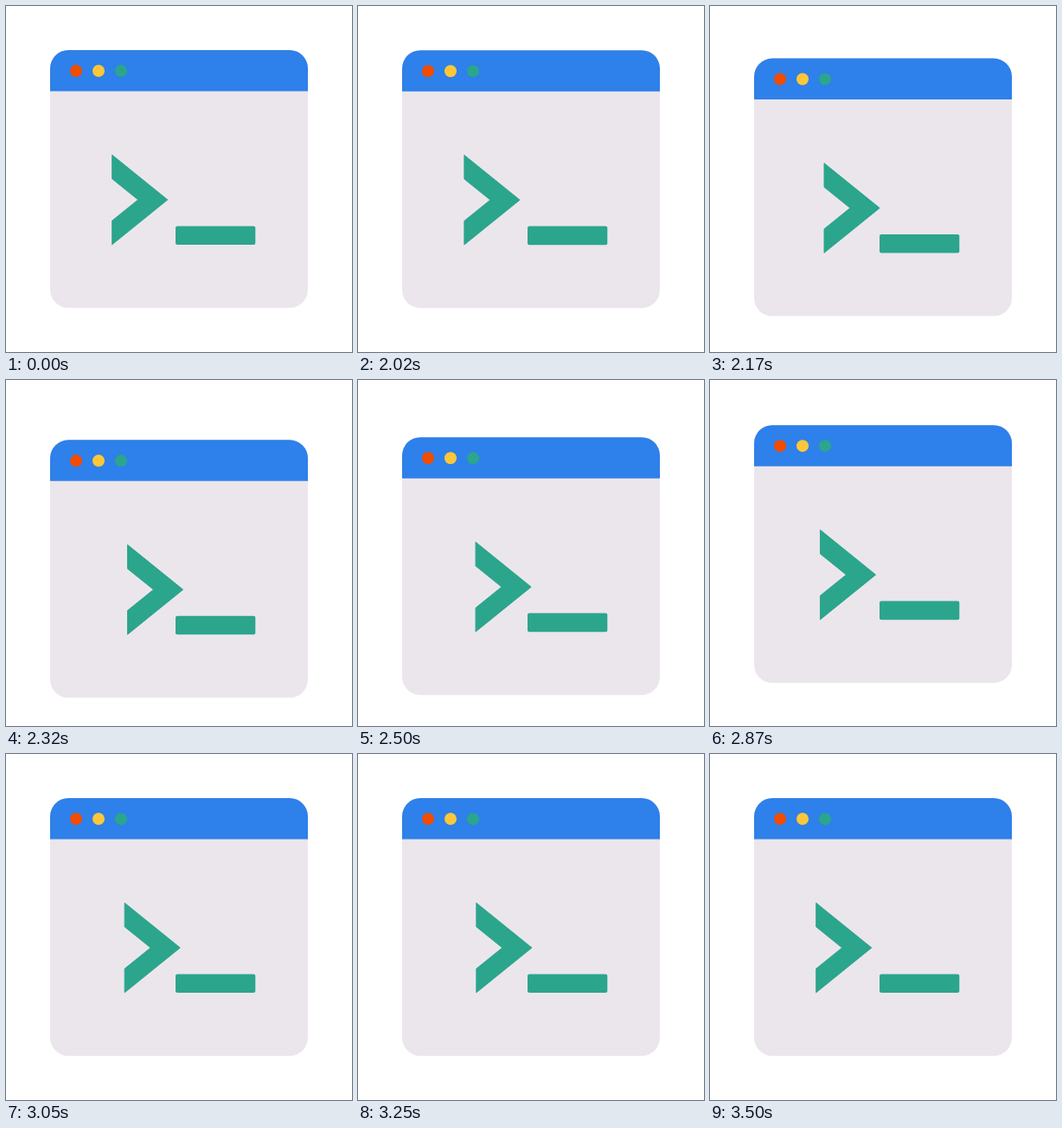
Write an HTML page that moves like this. It is 400 px wide and 400 px high and loops after 3.52 s.

```html
<!DOCTYPE html>
<html lang="en">
<head>
<meta charset="utf-8">
<title>Terminal window</title>
<style>
  html, body { margin: 0; width: 100%; height: 100%; overflow: hidden; background: #fff; }
  svg { display: block; width: 100%; height: 100%; }
</style>
</head>
<body>
<svg viewBox="0 0 400 400">
  <g id="win">
    <rect x="51" y="51" width="298" height="298" rx="21" fill="#ebe6ec"/>
    <path d="M51 98.5V72a21 21 0 0 1 21-21H328a21 21 0 0 1 21 21V98.5Z" fill="#2e80ea"/>
    <circle cx="81" cy="75" r="7" fill="#f24c00"/>
    <circle cx="107" cy="75" r="7" fill="#ffc738"/>
    <circle cx="133" cy="75" r="7" fill="#2ca58d"/>
    <rect x="196" y="254.4" width="92.3" height="21.6" rx="2" fill="#2ca58d"/>
    <path id="prompt" d="M122.7 172.2L186.8 224L122.7 275.8V248.2L152.7 224L122.7 199.8Z"
      fill="#2ca58d" stroke="#2ca58d" stroke-width="1" stroke-linejoin="round"/>
  </g>
</svg>
<script>
const LOOP = 3520;
const win = document.getElementById('win');
const prompt_ = document.getElementById('prompt');

// Keys are [time in ms, offset in px], eased in and out
const drop = [[2000, 0], [2333, 18.4], [2967, 0]];
const slide = [[2000, 0], [2333, 17.9], [2791, 3], [3157, 17.4], [3497, 0]];

const ease = u => u * u * (3 - 2 * u);

function valueAt(keys, t) {
  if (t <= keys[0][0]) return keys[0][1];
  for (let i = 1; i < keys.length; i++) {
    const [t0, a] = keys[i - 1], [t1, b] = keys[i];
    if (t < t1) return a + (b - a) * ease((t - t0) / (t1 - t0));
  }
  return keys[keys.length - 1][1];
}

function draw(t) {
  win.setAttribute('transform', `translate(0 ${valueAt(drop, t).toFixed(3)})`);
  prompt_.setAttribute('transform', `translate(${valueAt(slide, t).toFixed(3)} 0)`);
}

const start = performance.now();
function tick() {
  draw((performance.now() - start) % LOOP);
  requestAnimationFrame(tick);
}
draw(0);
requestAnimationFrame(tick);
</script>
</body>
</html>
```
